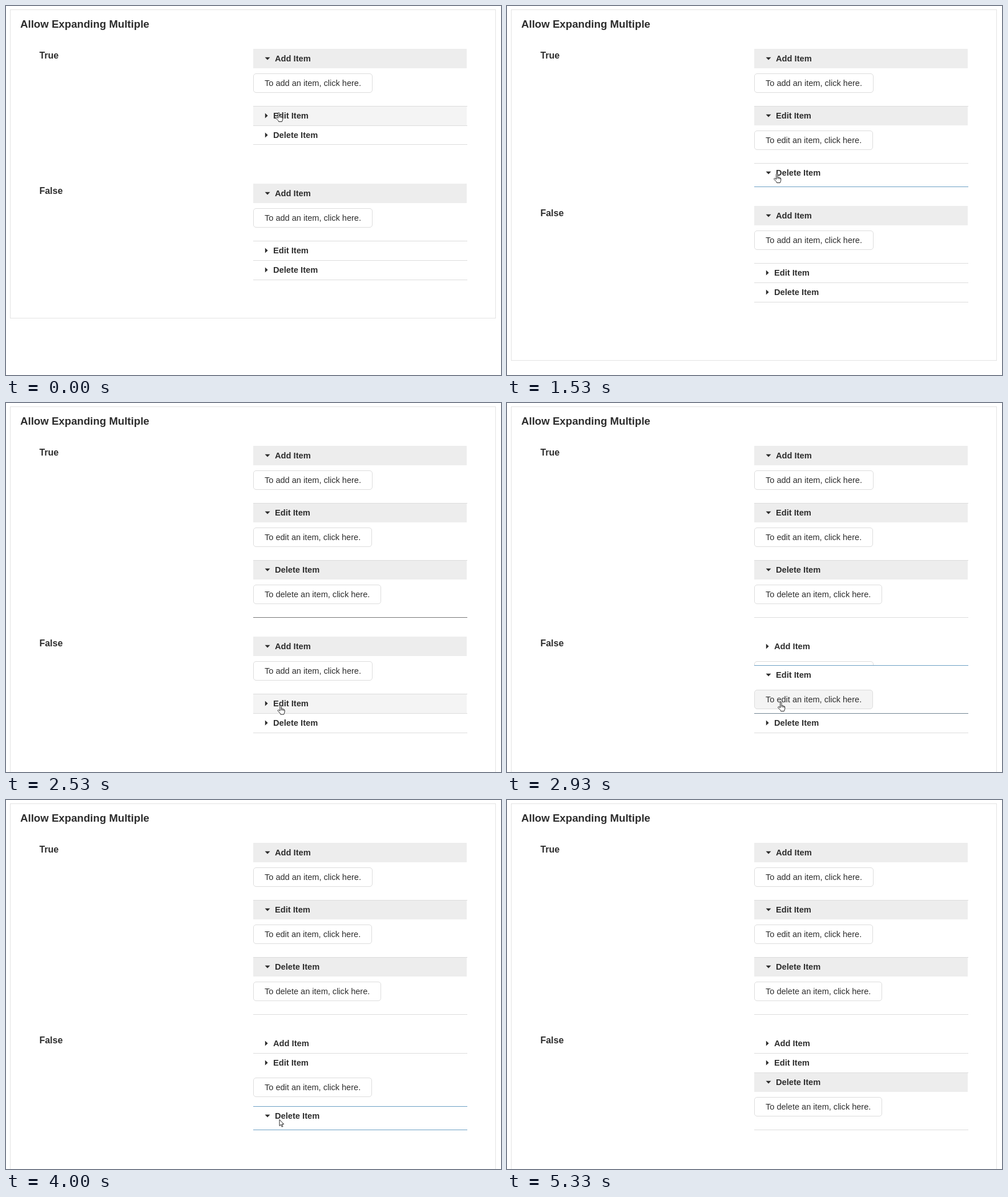
An HTML page for the animation above (5470 ms loop, 867 by 646 pixels).

```html
<!DOCTYPE html>
<html lang="en">
<head>
<meta charset="utf-8">
<title>Allow Expanding Multiple</title>
<style>
  html, body { margin: 0; width: 100%; height: 100%; overflow: hidden; background: #fff; }
  body { position: relative; color: #2d2d2d; font-family: "Liberation Sans", Arial, sans-serif; }
  body * { position: absolute; box-sizing: border-box; white-space: nowrap; }
  #stage { left: 0; top: 0; width: 867px; height: 646px; overflow: hidden; }
  #panel { left: 7px; top: 6px; width: 851px; border: 1px solid #e2e2e2; }
  h1, h2, h3 { margin: 0; font-weight: bold; }
  h1 { left: 25px; top: 20px; font-size: 18.67px; line-height: 24px; }
  h2 { left: 58.4px; font-size: 16px; line-height: 24px; }
  .head { left: 433px; width: 374px; height: 34px; }
  .head h3 { top: 0; font-size: 14.67px; line-height: 34px; }
  .head svg { left: 20px; top: 12px; width: 10px; height: 10px; fill: #2d2d2d; }
  .body { left: 433px; width: 375px; overflow: hidden; }
  .button { left: 0; height: 34px; padding: 0 19px; border: 1px solid #dcdcdc; border-radius: 5px;
            font-size: 14.56px; line-height: 32px; }
  .line { left: 433px; width: 375px; height: 1px; }
  #cursor { left: 0; top: 0; width: 16px; height: 20px; overflow: visible; }
  #cursor path { stroke: #222; stroke-width: 1; stroke-linejoin: round; }
</style>
</head>
<body>
<div id="stage">
  <div id="panel"></div>
  <h1>Allow Expanding Multiple</h1>
  <svg id="cursor" viewBox="0 0 16 20">
    <path id="hand" fill="#fff" d="M4.5 10.5V1.8a1.2 1.2 0 0 1 2.4 0V7a1.2 1.1 0 0 1 2.2 0v.6a1.1 1.1 0 0 1 2 .2v.6a1 1 0 0 1 1.6.6v3.5l-1.4 4H5.6l-.8-2L1 10.6A1.1 1.1 0 0 1 2.7 9zM6.9 7v2.6M9.1 7.6v2.2M11.1 8.4v1.6"/>
    <path id="arrow" fill="#fff" d="M.5.5v11L3 9.2l1.7 4 1.7-.7-1.7-3.9h3.5z"/>
  </svg>
</div>
<script>
const LOOP = 5470, TICK = 200 / 3, DURATION = 300;
const HEAD = 33.9, BODY = 66.2;
const LIGHT = '#dcdcdc', BLUE = '#6b9fc4', SLATE = '#6f8291', DARK = '#767676';
const OPEN_ICON = 'M.5 2.8h9L5 7.4z', CLOSED_ICON = 'M.8.5v9L5.6 5z';
const stage = document.getElementById('stage');
const panel = document.getElementById('panel');
const cursor = document.getElementById('cursor');
const hand = document.getElementById('hand');
const arrow = document.getElementById('arrow');

// Each item: open from / until, header kept white until, slide start times
const ALWAYS = { from: -1, until: Infinity, white: -1 };
const sections = [
  { name: 'True',
    items: [ALWAYS,
      { from: 266, until: Infinity, white: 870, grow: 266.7 },
      { from: 1466, until: Infinity, white: 1640, grow: 1466.7 }],
    lines: [[], [[266, 1000, BLUE]], [[1466, 1800, BLUE], [1800, 2730, DARK]]] },
  { name: 'False',
    items: [
      { from: -1, until: 2730, white: -1, shrink: 2733.3 },
      { from: 2730, until: 3799, white: 3130, grow: 2733.3, shrink: 3940 },
      { from: 3799, until: Infinity, white: 4530, grow: 3940 }],
    lines: [[[2730, 3200, BLUE]],
      [[2730, 3200, SLATE], [3799, 5330, BLUE]],
      [[3799, 5330, BLUE]]] }
];

// time, x, y
const track = [
  [0, 472, 186], [66, 471, 186], [733, 471, 186], [1133, 469, 304], [1333, 467, 293],
  [1600, 467, 293], [1933, 508, 416], [2000, 506, 417], [2400, 478, 540], [2600, 474, 523],
  [2933, 474, 523], [3266, 476, 556], [3333, 476, 557], [3400, 476, 559], [3933, 476, 559],
  [3999, 478.5, 559], [4400, 478.5, 559], [4866, 34, 640], [4933, 20, 660], [5470, 20, 660]
];
const arrowTimes = [[1860, 2060], [3990, 5470]];

function add(tag, parent, cls, text = '') {
  const node = document.createElement(tag);
  node.className = cls;
  node.textContent = text;
  parent.insertBefore(node, parent === stage ? cursor : null);
  return node;
}

for (const s of sections) {
  s.label = add('h2', stage, '', s.name);
  s.parts = ['Add', 'Edit', 'Delete'].map(verb => {
    const head = add('div', stage, 'head');
    head.innerHTML = '<svg viewBox="0 0 10 10"><path/></svg>';
    const title = add('h3', head, '', verb + ' Item');
    const body = add('div', stage, 'body');
    const button = add('div', body, 'button', `To ${verb.toLowerCase()} an item, click here.`);
    return { head, title, body, button, icon: head.querySelector('path') };
  });
  s.rules = s.lines.map(() => add('div', stage, 'line'));
}

const within = (t, spans) => spans.find(([a, b]) => t >= a && t < b);

function swing(t, start) {
  const p = Math.min(1, Math.max(0, (t - start) / DURATION));
  return 0.5 - Math.cos(Math.PI * p) / 2;
}

function bodyHeight(item, t) {
  const grown = item.grow ? swing(t, item.grow) : 1;
  const shrunk = item.shrink ? swing(t, item.shrink) : 0;
  return BODY * (grown - shrunk);
}

function pointer(t) {
  const i = Math.max(1, track.findIndex(k => k[0] > t));
  const [t0, x0, y0] = track[i - 1], [t1, x1, y1] = track[i];
  const p = (t - t0) / (t1 - t0);
  return { x: x0 + (x1 - x0) * p, y: y0 + (y1 - y0) * p, arrow: !!within(t, arrowTimes) };
}

function drawSection(s, top, t, mouse) {
  const over = (y, h, w) => !mouse.arrow && mouse.x + 5 >= 433 && mouse.x + 5 < 433 + w &&
    mouse.y >= y && mouse.y < y + h;
  s.label.style.top = Math.round(top) + 'px';
  let y = top;
  s.parts.forEach((part, i) => {
    const item = s.items[i], height = bodyHeight(item, t);
    const open = t >= item.from && t < item.until;
    const hover = over(y, HEAD, 374);
    const white = open ? hover || t < item.white : !hover;
    const headTop = Math.floor(y), bodyTop = Math.floor(y + HEAD);
    part.head.style.top = headTop + 'px';
    part.head.style.background = white ? '#fff' : open ? '#ededed' : '#f4f4f4';
    part.title.style.left = (open ? 38 : 35) + 'px';
    part.icon.setAttribute('d', open ? OPEN_ICON : CLOSED_ICON);

    const buttonTop = Math.round(y + HEAD + 8.8);
    part.body.style.top = bodyTop + 'px';
    part.body.style.height = Math.max(0, Math.floor(y + HEAD + height) - bodyTop) + 'px';
    part.button.style.top = buttonTop - bodyTop + 'px';
    part.button.style.background =
      height > 20 && over(buttonTop, 34, 207) ? '#f4f4f4' : '#fff';

    y += HEAD + height;
    const tint = within(t, s.lines[i]);
    s.rules[i].style.top = Math.floor(y) + 'px';
    s.rules[i].style.background = tint ? tint[2] : LIGHT;
  });
  return y;
}

function draw(ms) {
  const t = Math.floor((ms + 3.4) / TICK) * TICK;
  const mouse = pointer(Math.min(t, LOOP - 1));
  const end = drawSection(sections[0], 75.05, t, mouse);
  const growth = end - 242.95;
  drawSection(sections[1], Math.max(311.5 + growth / 2, end + 33.9), t, mouse);
  panel.style.height = Math.floor(546.2 + growth) - 5 + 'px';
  cursor.style.transform = `translate(${mouse.x}px, ${mouse.y}px)`;
  hand.style.display = mouse.arrow ? 'none' : '';
  arrow.style.display = mouse.arrow ? '' : 'none';
}

const began = performance.now();
function loop() {
  draw((performance.now() - began) % LOOP);
  requestAnimationFrame(loop);
}
loop();
</script>
</body>
</html>
```
